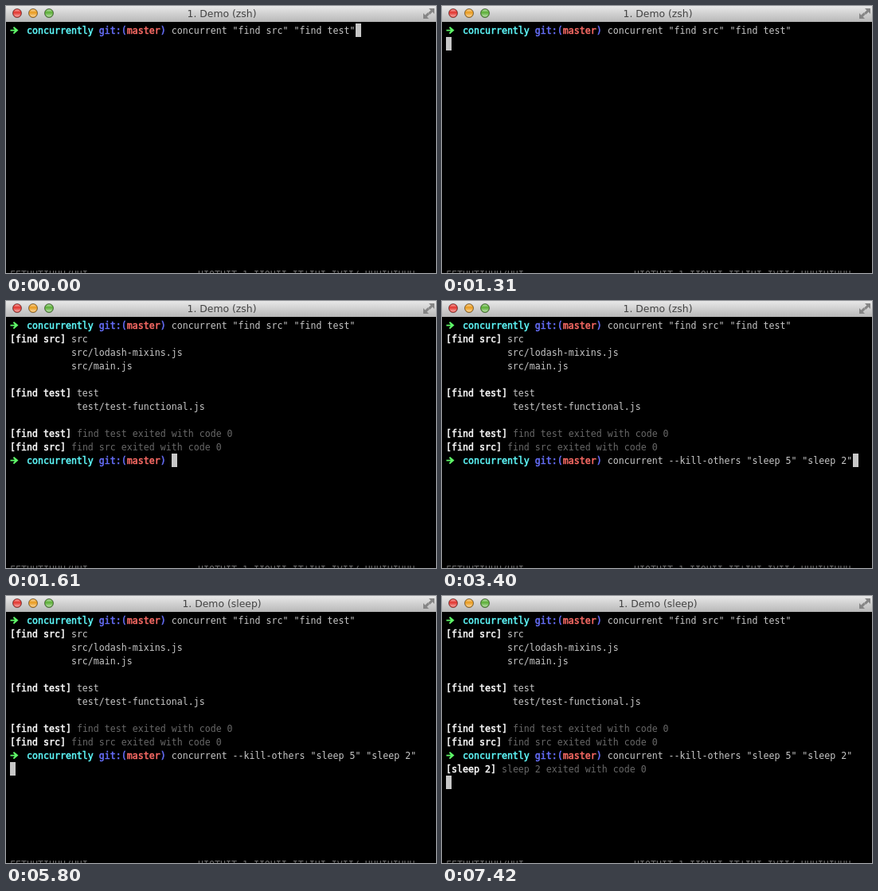
Animation, 540 px wide and 336 px high, one loop 8000 ms. Source, as an HTML page:

```html
<!DOCTYPE html>
<html lang="en">
<head>
<meta charset="utf-8">
<title>Terminal demo</title>
<style>
  html, body { margin: 0; width: 100%; height: 100%; overflow: hidden; background: #000; }
  svg { display: block; }
  text { white-space: pre; }
  .mono { font: 11.628px "DejaVu Sans Mono", "Liberation Mono", monospace; fill: #c7c7c7; }
  .title { font: 12.4px "DejaVu Sans", "Noto Sans", sans-serif; fill: #434343; text-anchor: middle; }
  .white, .cyan, .blue, .red { fill: var(--ink); stroke: var(--ink); stroke-width: .5px; }
  .white { --ink: #fff; }
  .cyan { --ink: #60fdff; }
  .blue { --ink: #6871ff; }
  .red { --ink: #ff6d67; }
  .dim { fill: #686868; }
  .behind { fill: #6a6a6a; }
</style>
</head>
<body>
<svg width="540" height="336" viewBox="0 0 540 336">
  <defs>
    <linearGradient id="bar" x2="0" y2="1">
      <stop stop-color="#e8e8e8"/><stop offset="1" stop-color="#b8b8b8"/>
    </linearGradient>
    <linearGradient id="shine" x2="0" y2="1">
      <stop stop-color="#fff" stop-opacity=".6"/>
      <stop offset=".4" stop-color="#fff" stop-opacity="0"/>
      <stop offset="1" stop-color="#fff" stop-opacity=".6"/>
    </linearGradient>
    <path id="arrow" d="M5.5 7.7h5.4L8.8 5.2l1.3-1.2 5.4 4.6-5.4 4.6-1.3-1.2 2.1-2.5H5.5z" fill="#5ffa68"/>
    <path id="corner" d="M531 3h7v7l-2.4-2.4-3.2 3.2-2.2-2.2 3.2-3.2z" fill="#858585"/>
  </defs>
  <rect width="540" height="336"/>
  <rect width="540" height="20" fill="url(#bar)"/>
  <g id="buttons"></g>
  <text id="title" class="title" x="271" y="14"></text>
  <use href="#corner"/>
  <use href="#corner" transform="rotate(180 531 9.5)"/>
  <g id="screen"></g>
  <rect id="cursor" width="7" height="17" fill="#c7c7c7"/>
  <text class="mono behind" x="5" y="342">FETUHTIUUU/UUI</text>
  <text class="mono behind" x="241" y="342">UIOTUIT 1 IIOUII IT'IUI IVII/ UUUIUIUUU</text>
</svg>
<script>
const LOOP = 8000, CELL = 7, LINE = 17, LEFT = 5, TOP = 22;
const byId = id => document.getElementById(id);

const span = (style, text) => `<tspan class="${style}">${text}</tspan>`;
const prompt = (command = "") => ({
  arrow: true,
  html: "   " + span("cyan", "concurrently") + " " + span("blue", "git:(") +
        span("red", "master") + span("blue", ")") + " " + command
});
const output = (name, text) => ({ html: span("white", `[${name}]`) + " " + text });
const exited = name => output(name, span("dim", `${name} exited with code 0`));
const indent = (columns, text) => ({ html: " ".repeat(columns) + text });
const blank = { html: "" };

const first = [prompt('concurrent "find src" "find test"')];
const listing = [
  ...first,
  output("find src", "src"),
  indent(11, "src/lodash-mixins.js"),
  indent(11, "src/main.js"),
  blank,
  output("find test", "test"),
  indent(12, "test/test-functional.js"),
  blank,
  exited("find test"),
  exited("find src")
];
const second = [...listing, prompt('concurrent --kill-others "sleep 5" "sleep 2"')];

// Start time, terminal lines, cursor column and row, foreground process
const states = [
  [0, first, 62, 0, "zsh"],
  [1310, first, 0, 1, "zsh"],
  [1550, listing, 0, 10, "zsh"],
  [1610, [...listing, prompt()], 29, 10, "zsh"],
  [3400, second, 73, 10, "zsh"],
  [5200, second, 0, 11, "zsh"],
  [5800, second, 0, 11, "sleep"],
  [7420, [...second, exited("sleep 2")], 0, 12, "sleep"]
];

const drawLine = ({ arrow, html }, row) => {
  const y = TOP + row * LINE;
  return (arrow ? `<use href="#arrow" y="${y}"/>` : "") +
    `<text class="mono" xml:space="preserve" x="${LEFT}" y="${y + 13}">${html}</text>`;
};

byId("buttons").innerHTML = ["#e2332c", "#e99a1c", "#5aae35"].map((color, i) => {
  const circle = `cx="${14 + 20 * i}" cy="9"`;
  return `<circle ${circle} r="5.5" fill="${color}" stroke="#000" stroke-opacity=".45"/>
    <circle ${circle} r="4.6" fill="url(#shine)"/>`;
}).join("");

let shown;
function render(time) {
  const state = states.findLast(([start]) => start <= time);
  if (state === shown) return;
  shown = state;
  const [, lines, column, row, process] = state;
  byId("screen").innerHTML = lines.map(drawLine).join("");
  byId("cursor").setAttribute("x", LEFT + column * CELL);
  byId("cursor").setAttribute("y", TOP + row * LINE);
  byId("title").textContent = `1. Demo (${process})`;
}

const begin = performance.now();
function tick() {
  render((performance.now() - begin) % LOOP);
  requestAnimationFrame(tick);
}
tick();
</script>
</body>
</html>
```
